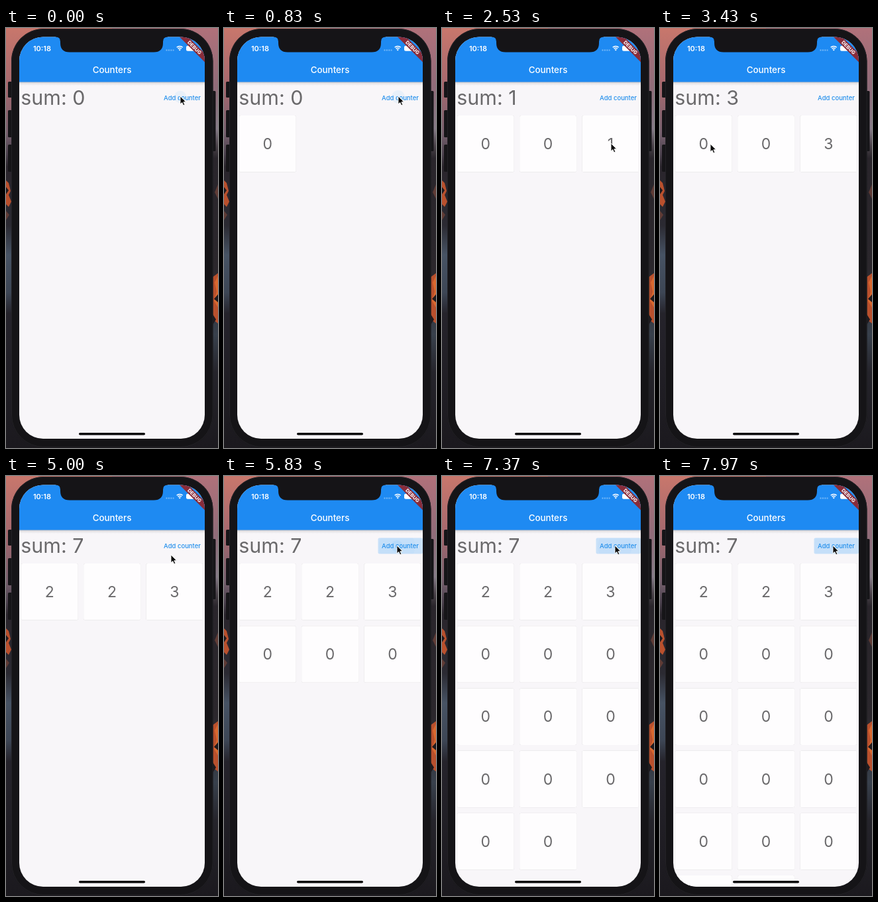
Write an HTML page that moves like this. It is 320 px wide and 634 px high and loops after 8 s.

```html
<!DOCTYPE html>
<html lang="en">
<head>
<meta charset="utf-8">
<title>Counters</title>
<style>
html, body { margin: 0; width: 100%; height: 100%; overflow: hidden; background: #1d1b21; }
svg { display: block; width: 320px; height: 634px; font-family: Inter, "Open Sans", sans-serif; }
.card rect { fill: #fefdfe; filter: drop-shadow(0 .9px .5px rgba(0, 0, 0, .22)); }
.card text { font-size: 23px; text-anchor: middle; fill: #6a696b; }
</style>
</head>
<body>
<svg viewBox="0 0 320 634">
  <defs>
    <linearGradient id="leftSky" x2="0" y2="1">
      <stop offset="0" stop-color="#c8776c"/>
      <stop offset=".14" stop-color="#a5686e"/>
      <stop offset=".25" stop-color="#77606e"/>
      <stop offset=".3" stop-color="#4b414d"/>
      <stop offset=".33" stop-color="#2a252c"/>
      <stop offset=".47" stop-color="#2b2a32"/>
      <stop offset=".54" stop-color="#475364"/>
      <stop offset=".63" stop-color="#3d4655"/>
      <stop offset=".68" stop-color="#25232b"/>
      <stop offset="1" stop-color="#1b191e"/>
    </linearGradient>
    <linearGradient id="rightSky" x2="0" y2="1">
      <stop offset="0" stop-color="#b0717a"/>
      <stop offset=".14" stop-color="#906c79"/>
      <stop offset=".24" stop-color="#877c88"/>
      <stop offset=".28" stop-color="#4a4249"/>
      <stop offset=".31" stop-color="#29252b"/>
      <stop offset=".57" stop-color="#2b272c"/>
      <stop offset=".73" stop-color="#38404c"/>
      <stop offset=".82" stop-color="#25242b"/>
      <stop offset="1" stop-color="#1b191e"/>
    </linearGradient>
    <linearGradient id="barShadow" x2="0" y2="1">
      <stop offset="0" stop-color="#000" stop-opacity=".24"/>
      <stop offset=".4" stop-color="#000" stop-opacity=".08"/>
      <stop offset="1" stop-color="#000" stop-opacity="0"/>
    </linearGradient>
    <clipPath id="screen"><rect x="20" y="13.500" width="280" height="606.500" rx="36"/></clipPath>
    <clipPath id="button"><rect x="232.500" y="93.500" width="67.500" height="24" rx="2"/></clipPath>
  </defs>

  <rect width="160" height="634" fill="url(#leftSky)"/>
  <rect x="160" width="160" height="634" fill="url(#rightSky)"/>
  <path fill="#b9502d" d="M0 230l4 4 3 12-3 6 4 10-4 8-4-4zM312 376l8-6v76l-8-6z"/>
  <path fill="#d9682f" d="M320 374l-5 10 3 14-4 14 6 10z"/>
  <path fill="#1f1a1e" d="M0 240l4 5-4 6zM320 402l-6 7 6 5zM312 432l5 8-5 8z"/>
  <path fill="#5f3b35" d="M0 276l5 6-5 8zM320 236l-5 12 5 10z"/>

  <g fill="#161518">
    <rect x="3" y="81" width="7" height="24" rx="1.5"/>
    <rect x="3" y="124" width="7" height="41" rx="1.5"/>
    <rect x="3" y="176" width="7" height="41" rx="1.5"/>
    <rect x="310" y="95" width="6.500" height="91" rx="1.5"/>
  </g>
  <rect x="8" y="1" width="304.500" height="632" rx="49" fill="#151417"/>
  <rect x="8.500" y="1.500" width="303.500" height="631" rx="48.500" fill="none" stroke="#232226"/>

  <g clip-path="url(#screen)">
    <rect x="20" y="13" width="280" height="607" fill="#f8f6f9"/>
    <text id="sum" x="22.300" y="116.300" font-size="30.400" fill="#6a696b"></text>
    <g clip-path="url(#button)" fill="#2196f3">
      <rect id="highlight" x="232" y="93" width="68" height="25"/>
      <g id="splashes"></g>
    </g>
    <text x="266" y="108.500" font-size="9.500" font-weight="500" text-anchor="middle" fill="#2490ec">Add counter</text>
    <g id="cards"></g>

    <rect x="20" y="81" width="280" height="6" fill="url(#barShadow)"/>
    <rect x="20" y="13" width="280" height="68.500" fill="#1e8af2"/>
    <g fill="#fff">
      <text x="160" y="67.500" font-size="13.400" font-weight="500" text-anchor="middle">Counters</text>
      <text x="54.500" y="35" font-size="11" font-weight="600" text-anchor="middle">10:18</text>
      <path d="M241.500 33.500h12" stroke="#fff" stroke-opacity=".4" stroke-width="1.800" stroke-dasharray="2 1.400"/>
      <path d="M257.700 29.300a6.300 6.300 0 0 1 9 0M259.500 31.300a3.800 3.800 0 0 1 5.400 0" fill="none" stroke="#fff" stroke-width="1.500"/>
      <path d="M260.600 32.700a2.300 2.300 0 0 1 3.200 0l-1.600 1.900z"/>
      <rect x="272" y="26.800" width="16" height="8" rx="2.200"/>
    </g>
    <g transform="translate(284.500 29.500) rotate(45)">
      <rect x="-34" y="-4.600" width="68" height="9.200" fill="#882c3a"/>
      <text y="2.600" font-size="7.500" font-weight="800" text-anchor="middle" fill="#f8eef0">DEBUG</text>
    </g>
    <rect x="110" y="611" width="100" height="3.600" rx="1.800" fill="#050505"/>
  </g>
  <path fill="#151417" d="M75 11v2.500q7 0 7 7v2q0 14 14 14h127q14 0 14-14v-2q0-7 7-7v-2.500z"/>

  <path id="cursor" d="M0 0v12l2.800-2.500 1.900 4.300 2.100-.9-1.900-4.200h3.700z" fill="#080808" stroke="#fff" stroke-width=".9" stroke-linejoin="round"/>
</svg>
<script>
const LOOP = 8000, PRESS = 130;
const byId = id => document.getElementById(id);
const clamp = v => Math.max(0, Math.min(1, v));
const ease = p => p * p * (3 - 2 * p);

// When a counter is added: three slow clicks, then a steady run
const adds = [90, 900, 1690, ...Array.from({ length: 14 }, (_, i) => 5370 + 194 * i)];
// When the counter with a given index is tapped
const taps = { 0: [3600, 3800], 1: [4300, 4500], 2: [2480, 2760, 3040] };
// [time, x, y] of the pointer tip
const route = [
  [0, 263, 103], [1850, 263, 103], [2250, 255, 174], [3100, 255, 174],
  [3400, 76, 175], [3880, 76, 175], [4150, 169, 175], [4600, 169, 175],
  [5000, 249, 119], [5180, 261, 105], [LOOP, 261, 105]
];

function setAll(node, attrs) {
  for (const key in attrs) node.setAttribute(key, attrs[key]);
  return node;
}

function make(tag, attrs, parent) {
  const node = document.createElementNS("http://www.w3.org/2000/svg", tag);
  return parent.appendChild(setAll(node, attrs));
}

const cards = adds.map((_, i) => {
  const x = 22.8 + 94.3 * (i % 3), y = 132 + 94.2 * Math.floor(i / 3);
  const group = make("g", { class: "card" }, byId("cards"));
  make("rect", { x, y, width: 86, height: 85.6, rx: 2.5 }, group);
  return { group, label: make("text", { x: x + 43, y: y + 51 }, group) };
});
const splashes = adds.map(() => make("circle", {}, byId("splashes")));

function pointer(t) {
  const k = Math.max(1, route.findIndex(stop => stop[0] > t));
  const [t0, x0, y0] = route[k - 1], [t1, x1, y1] = route[k];
  const p = ease((t - t0) / (t1 - t0));
  return [x0 + (x1 - x0) * p, y0 + (y1 - y0) * p];
}

function draw(t) {
  let sum = 0, glow = 0;
  cards.forEach(({ group, label }, i) => {
    const value = (taps[i] || []).filter(at => at <= t).length;
    sum += value;
    label.textContent = value;
    group.style.display = t >= adds[i] ? "" : "none";

    const age = t - adds[i] + PRESS;
    glow += Math.min(clamp((age - 100) / 100), clamp((450 - age) / 250));
    const [cx, cy] = pointer(Math.max(0, adds[i] - PRESS));
    setAll(splashes[i], {
      cx, cy: cy + 1,
      r: 9 + 26 * ease(clamp((age - 30) / 270)),
      opacity: age < 0 ? 0 : 0.07 * clamp((300 - age) / 220)
    });
  });
  byId("sum").textContent = "sum: " + sum;
  byId("highlight").setAttribute("opacity", 0.22 * clamp(glow));
  byId("cursor").setAttribute("transform", `translate(${pointer(t)})`);
}

const start = performance.now();
function tick() {
  draw((performance.now() - start) % LOOP);
  requestAnimationFrame(tick);
}
tick();
</script>
</body>
</html>
```
